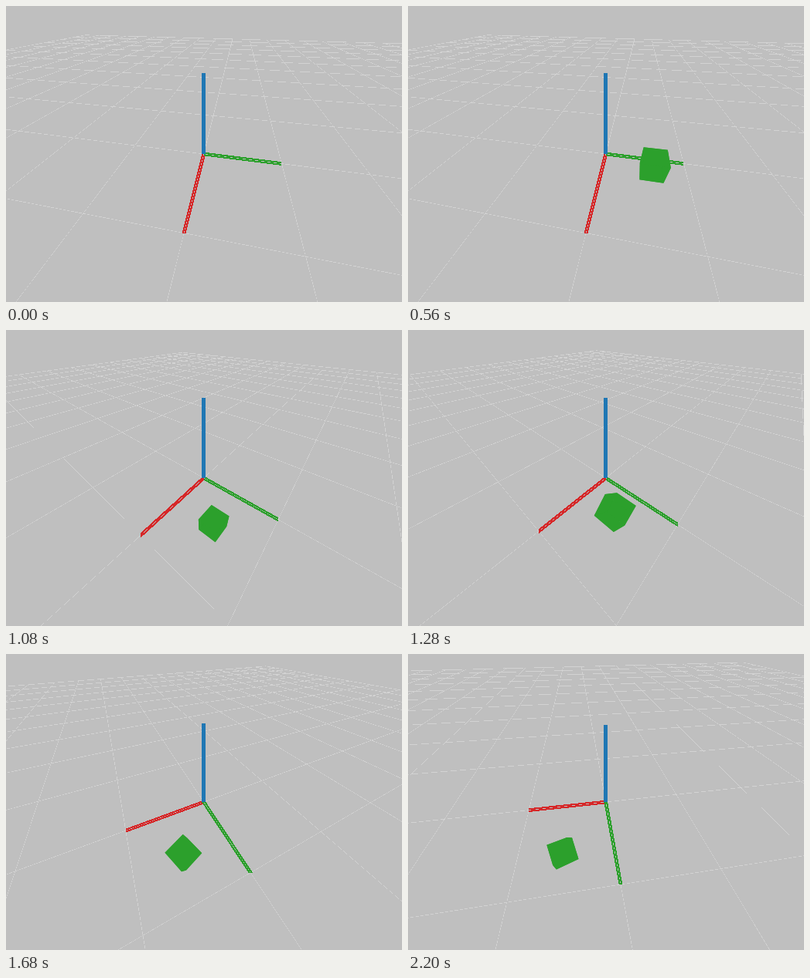
These frames come from a looping animation (512 by 384 pixels, 3040 ms). An HTML page with a canvas:

```html
<!DOCTYPE html>
<html lang="en">
<head>
<meta charset="utf-8">
<title>Bouncing cube</title>
<style>
  html, body { margin: 0; width: 100%; height: 100%; overflow: hidden; background: #bfbfbf; }
  canvas { display: block; }
</style>
</head>
<body>
<canvas id="stage" width="512" height="384"></canvas>
<script>
const W = 512, H = 384, LOOP = 3040, STEP = 40, END = 2200;
const FOCAL = 192, DIST = 2, CX = 255.7, CY = 192, NEAR = 0.05;
const GRAVITY = 9.81, HALF = 0.1, GRID = 10, CUT = 1.04;
const BG = '#bfbfbf', LINE = '#d3d3d3', RED = '#d62728', GREEN = '#2ca02c', BLUE = '#1f77b4';
const ctx = document.getElementById('stage').getContext('2d');
const rad = deg => deg * Math.PI / 180;

// Each hop: start time, height, upward speed
const hops = [
  [0, 1, -0.0245], [0.421, 0.1, 3.215], [1.0765, 0.1, 2.47],
  [1.574, 0.113, 1.75], [1.931, 0.115, 1.56]
];
// Time, sideways position
const drift = [
  [0.421, 0.5], [1.0765, 0.512], [1.28, 0.56], [1.68, 0.65], [1.931, 0.69]
];
// Time, rotation vector in degrees; a quarter turn looks the same
const spin = [
  [1.0765, 0, 0, 0], [1.574, 0, -97.8, 0], [1.574, 0, -7.8, 0],
  [1.68, -13.9, 14.9, 18.8], [2.2, -32.5, -19.6, 18.4]
];

function lerpKeys(keys, t) {
  if (t <= keys[0][0]) return keys[0].slice(1);
  for (let i = 1; i < keys.length; i++) {
    const [a, b] = [keys[i - 1], keys[i]];
    if (t < b[0]) {
      const k = (t - a[0]) / (b[0] - a[0]);
      return a.slice(1).map((v, j) => v + (b[j + 1] - v) * k);
    }
  }
  return keys[keys.length - 1].slice(1);
}

function cameraAt(t) {
  const k = Math.min(1, Math.max(0, (t - 1.08) / 1.08));
  const ease = k * k * (3 - 2 * k);
  const moved = t >= CUT;
  const yaw = rad(moved ? 38.1 + 44 * ease : 10);
  const pitch = rad(moved ? 45.6 + 4.7 * ease : 45);
  return {
    s: Math.sin(yaw), c: Math.cos(yaw),
    sp: Math.sin(pitch), cp: Math.cos(pitch)
  };
}

// World point to camera space: right, up, depth
function toView(cam, [x, y, z]) {
  const r = -x * cam.s + y * cam.c, f = x * cam.c + y * cam.s;
  return [r, z * cam.cp - f * cam.sp, DIST - f * cam.cp - z * cam.sp];
}

const project = ([r, v, d]) => [CX + FOCAL * r / d, CY - FOCAL * v / d];

// Unsmoothed line: a pixel is set when its centre lies inside the stroke
function pixelLine(a, b, width, color) {
  const m = Math.abs(b[0] - a[0]) >= Math.abs(b[1] - a[1]) ? 0 : 1, n = 1 - m;
  if (a[m] > b[m]) [a, b] = [b, a];
  const size = [W, H], slope = (b[n] - a[n]) / (b[m] - a[m]);
  const last = Math.min(size[m], Math.round(b[m]));
  const half = width > 1 ? width * Math.hypot(1, slope) / 2 : width / 2;
  ctx.fillStyle = color;
  for (let i = Math.max(0, Math.round(a[m])); i < last; i++) {
    const mid = a[n] + (i + 0.5 - a[m]) * slope;
    const lo = Math.ceil(mid - half - 0.5), hi = Math.ceil(mid + half - 0.5);
    if (hi <= lo || hi < 0 || lo > size[n]) continue;
    if (m) ctx.fillRect(lo, i, hi - lo, 1);
    else ctx.fillRect(i, lo, 1, hi - lo);
  }
}

function line3d(cam, p, q, width, color) {
  let a = toView(cam, p), b = toView(cam, q);
  if (a[2] < NEAR && b[2] < NEAR) return;
  if (a[2] > b[2]) [a, b] = [b, a];
  if (a[2] < NEAR) {
    const k = (NEAR - a[2]) / (b[2] - a[2]);
    a = a.map((v, i) => v + (b[i] - v) * k);
  }
  pixelLine(project(a), project(b), width, color);
}

function drawGrid(cam) {
  for (let i = -GRID; i <= GRID; i++) {
    line3d(cam, [i, -GRID, 0], [i, GRID, 0], 0.66, LINE);
    line3d(cam, [-GRID, i, 0], [GRID, i, 0], 0.66, LINE);
  }
}

function drawAxis(cam, tip, color, seam) {
  line3d(cam, [0, 0, 0], tip, 4.7, color);
  if (seam) line3d(cam, [0, 0, 0], tip, 0.42, BG);
}

function rotate([x, y, z], [a, b, c]) {
  const deg = Math.hypot(a, b, c);
  if (!deg) return [x, y, z];
  const [i, j, k] = [a / deg, b / deg, c / deg];
  const cos = Math.cos(rad(deg)), sin = Math.sin(rad(deg));
  const dot = (i * x + j * y + k * z) * (1 - cos);
  return [
    x * cos + (j * z - k * y) * sin + i * dot,
    y * cos + (k * x - i * z) * sin + j * dot,
    z * cos + (i * y - j * x) * sin + k * dot
  ];
}

function drawCube(cam, t) {
  const [start, base, speed] = hops.filter(h => h[0] <= t).pop();
  const dt = t - start;
  const pos = [0.505, lerpKeys(drift, t)[0], base + speed * dt - GRAVITY * dt * dt / 2];
  const turn = lerpKeys(spin, t);
  const corner = bits => {
    const local = [0, 1, 2].map(i => bits >> i & 1 ? HALF : -HALF);
    return project(toView(cam, rotate(local, turn).map((v, i) => v + pos[i])));
  };
  const pts = [...Array(8).keys()].map(corner);
  ctx.fillStyle = GREEN;
  for (let axis = 0; axis < 3; axis++) {
    const u = 1 << (axis + 1) % 3, v = 1 << (axis + 2) % 3;
    for (const side of [0, 1 << axis]) {
      ctx.beginPath();
      for (const n of [side, side + u, side + u + v, side + v]) ctx.lineTo(...pts[n]);
      ctx.fill();
    }
  }
}

function draw(ms) {
  const t = Math.min(ms, END) / 1000, cam = cameraAt(t);
  ctx.fillStyle = BG;
  ctx.fillRect(0, 0, W, H);
  drawGrid(cam);
  drawAxis(cam, [1, 0, 0], RED, true);
  drawAxis(cam, [0, 1, 0], GREEN, true);
  drawAxis(cam, [0, 0, 1], BLUE, false);
  if (ms >= STEP) drawCube(cam, t);
}

const begin = performance.now();
let shown = -1;
function tick() {
  const ms = Math.floor((performance.now() - begin) % LOOP / STEP) * STEP;
  if (ms !== shown) draw(shown = ms);
  requestAnimationFrame(tick);
}
tick();
</script>
</body>
</html>
```
